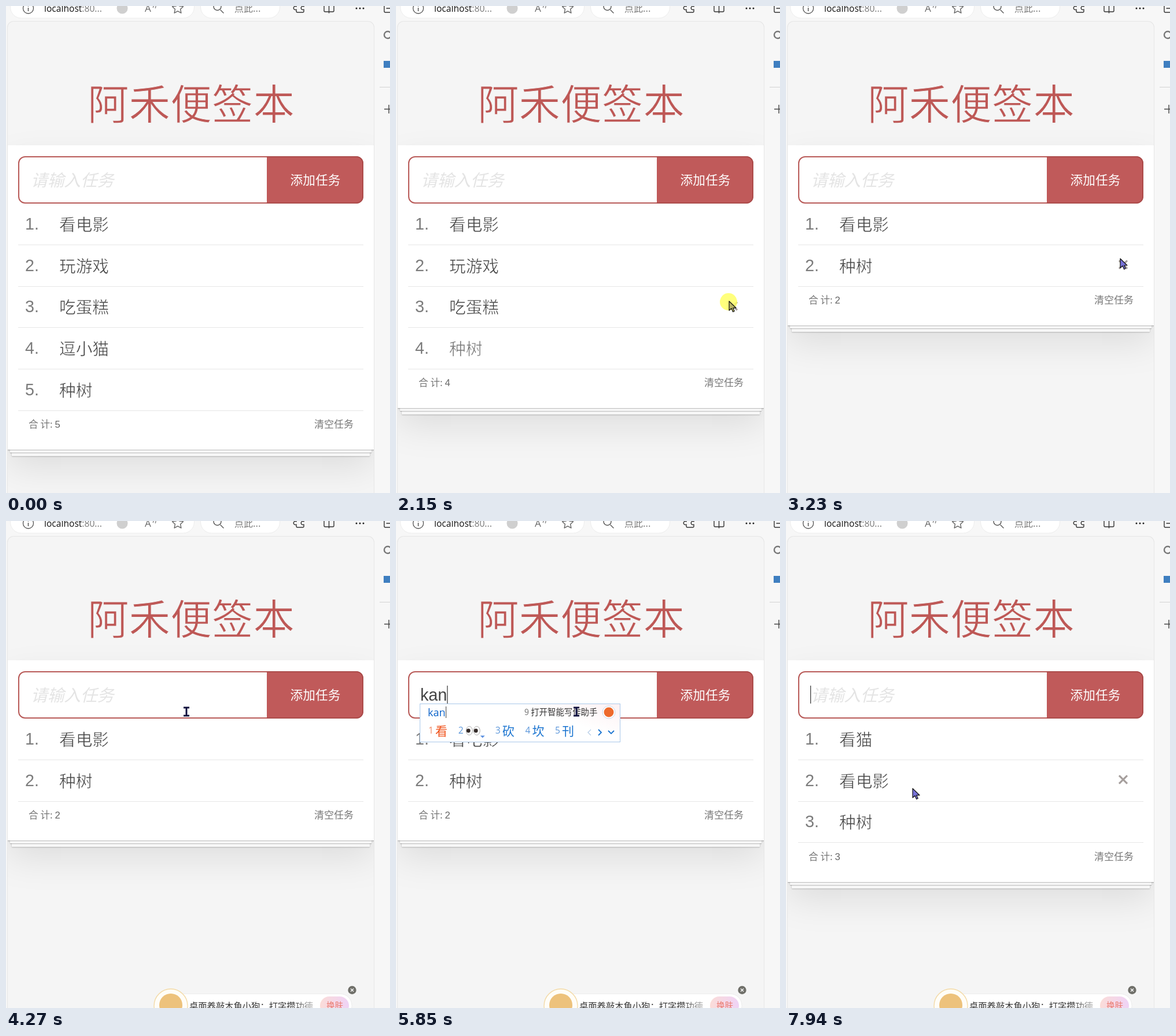
These frames come from a looping animation (664x843 px, 8000 ms). An HTML page:

```html
<!DOCTYPE html>
<html lang="zh-CN">
<head>
<meta charset="utf-8">
<title>Todo list</title>
<style>
html, body { margin: 0; width: 100%; height: 100%; overflow: hidden; background: #f7f7f7; }
#stage { position: relative; width: 100%; height: 100%; overflow: hidden; contain: strict; }
#page { position: absolute; left: 2px; top: 26px; width: 633px; bottom: 0; overflow: hidden;
  border: 1px solid #e6e6e6; border-bottom: 0; border-radius: 11px 11px 0 0; background: #f5f5f5; }
#card { position: absolute; left: 0; top: 214px; width: 633px; background: #fff;
  box-shadow: 0 1px 1px rgba(0,0,0,.22), 0 9px 0 -4px #f7f7f7, 0 10px 1px -4px rgba(0,0,0,.22),
    0 18px 0 -7px #f7f7f7, 0 19px 2px -7px rgba(0,0,0,.22),
    0 2px 4px rgba(0,0,0,.08), 0 30px 60px rgba(0,0,0,.1); }
svg { position: absolute; left: 0; top: 0; }
text { font-family: "Noto Sans CJK SC", "Noto Sans CJK", sans-serif; font-weight: 300; white-space: pre; }
.arial { font-family: "Liberation Sans", Arial, sans-serif; font-weight: 400; }
.ui { font-family: "Open Sans", "Noto Sans CJK SC", sans-serif; font-weight: 400; }
.title { stroke: #f4f4f4; stroke-width: 1; }
.thin { stroke: #fff; stroke-width: .6; }
.icon { fill: none; stroke: #333; stroke-width: 1.4; stroke-linecap: round; stroke-linejoin: round; }
</style>
</head>
<body>
<div id="stage">
<div id="page"><div id="card"></div></div>
<svg width="664" height="843" viewBox="0 0 664 843">
  <defs>
    <linearGradient id="skin"><stop stop-color="#fbdcd8"/><stop offset="1" stop-color="#efd3f6"/></linearGradient>
    <linearGradient id="panel" y1=".6" x2="1" y2="0">
      <stop offset=".6" stop-color="#fff"/><stop offset="1" stop-color="#fdf1f3"/>
    </linearGradient>
    <linearGradient id="fade" gradientUnits="userSpaceOnUse" x1="495" x2="532">
      <stop stop-color="#333"/><stop offset="1" stop-color="#bbb"/>
    </linearGradient>
  </defs>
  <g id="chrome"></g>
  <g id="live"></g>
</svg>
</div>
<script>
const LOOP = 8000, ROW = 71.7, TOP = 342, BLINK = 530;
const $ = id => document.getElementById(id);
const pen = document.createElement('canvas').getContext('2d');

const text = (x, y, size, fill, str, attrs = '') =>
  `<text x="${x}" y="${y}" font-size="${size}" fill="${fill}" ${attrs}>${str}</text>`;
const rect = (x, y, w, h, fill, attrs = '') =>
  `<rect x="${x}" y="${y}" width="${w}" height="${h}" fill="${fill}" ${attrs}/>`;
const circle = (x, y, r, fill, attrs = '') =>
  `<circle cx="${x}" cy="${y}" r="${r}" fill="${fill}" ${attrs}/>`;
const path = (d, attrs = 'class="icon"') => `<path d="${d}" ${attrs}/>`;
const line = (d, color, width) => path(d, `fill="none" stroke="${color}" stroke-width="${width}"`);
const width = (str, font) => { pen.font = font; return pen.measureText(str).width; };
const last = (list, t) => list.filter(k => k[0] <= t).pop();

function star(cx, cy, r) {
  const pts = Array.from({ length: 10 }, (_, i) => {
    const a = i * Math.PI / 5 - Math.PI / 2, q = i % 2 ? r * .48 : r;
    return (cx + q * Math.cos(a)).toFixed(1) + ' ' + (cy + q * Math.sin(a)).toFixed(1);
  });
  return path('M' + pts.join('L') + 'Z', 'class="icon" style="stroke:#666"');
}

function chrome() {
  const pill = 'rx="19" stroke="#ededed"';
  return rect(7.5, -18, 318, 39, '#fff', pill) + rect(336.5, -18, 137, 39, '#fff', pill)
    + circle(38.5, 4, 9, 'none', 'stroke="#555" stroke-width="1.3"') + line('M38.5 3V9M38.5 -1V.8', '#555', 1.5)
    + text(66, 10, 15.6, '#111', 'localhost<tspan fill="#777">:80...</tspan>', 'class="ui"')
    + circle(201, 4, 9.5, '#cfcfcf')
    + text(240, 10, 17, '#666', 'A', 'class="ui"') + line('M254 -3q2 3 0 6M258 -3q2 4 0 7', '#777', 1.2)
    + star(297, 4, 10)
    + path('M371 7L376 12M372 1a6.5 6.5 0 1 1-13 0a6.5 6.5 0 1 1 13 0', 'class="icon" style="stroke:#555"')
    + text(395, 10, 16, '#777', '点此...')
    + path('M502 -4V1a3 3 0 1 0 0 5V9q0 2 2 2H513q2 0 2-2V6a3 3 0 1 1 0-5V-4')
    + path('M550 -4V8q0 2 2 2H565q2 0 2-2V-4M558.5 -4V12')
    + [606, 612, 618].map(x => circle(x, 4, 1.5, '#222')).join('')
    + path('M664 -3H656q-2 0-2 2V9q0 2 2 2H664M658 4H664')
    + circle(660, 50, 6, 'none', 'stroke="#777" stroke-width="2.4"')
    + rect(653, 95, 12, 12, '#3f7fc0')
    + line('M646 140.5H664', '#d2d2d2', 1) + line('M654 178.5H664M662 171V186', '#444', 1.4)
    + text(320, 196, 71.6, '#be5856', '阿禾便签本', 'text-anchor="middle" class="title"')
    + rect(22, 261, 595, 80, '#fff', 'rx="11" stroke="#b85a58" stroke-width="2"')
    + path('M451 261H606a11 11 0 0 1 11 11V330a11 11 0 0 1-11 11H451Z', 'fill="#c05a5a"')
    + line('M451 261H606a11 11 0 0 1 11 11V330a11 11 0 0 1-11 11H451', '#a84847', 1.6)
    + text(535, 308.5, 21.7, '#fff', '添加任务', 'text-anchor="middle"');
}

function tasks(t) {
  const list = ['看电影', '玩游戏', '吃蛋糕', '逗小猫', '种树'];
  [[910, 3], [2280, 2], [3000, 1]].forEach(([at, i]) => t >= at && list.splice(i, 1));
  if (t >= 7250) list.unshift('看猫');
  return list;
}

// time, x, y of the pointer tip
const route = [[60, 258, 846], [300, 430, 745], [540, 626, 650], [700, 583, 590], [840, 579, 586],
  [1240, 579, 586], [1570, 576, 511], [2330, 576, 511], [2540, 578, 439], [3440, 578, 437],
  [3720, 312, 330], [7870, 312, 330], [7900, 219, 463], [LOOP, 219, 463]];

function pointer(t) {
  if (t < 60) return null;
  const i = route.findIndex(p => p[0] > t), a = route[i - 1], b = route[i];
  let k = (t - a[0]) / (b[0] - a[0]);
  if (t > 1240) k = k * k * (3 - 2 * k);
  return { x: a[1] + (b[1] - a[1]) * k, y: a[2] + (b[2] - a[2]) * k };
}

const clicks = [[700, 910], [2080, 2280], [2830, 3000]];

function drawPointer(t, p) {
  if (p.y < TOP && p.x < 451) {
    const d = `M${p.x - 5} ${p.y - 7}h10M${p.x - 5} ${p.y + 7}h10M${p.x} ${p.y - 7}v14`;
    return line(d, '#aab', 3.6) + line(d, '#0d0d3c', 2.5);
  }
  const down = clicks.some(c => t >= c[0] && t < c[1]);
  const fill = down ? '#b9b466' : t < 2540 ? '#777' : '#7772d8';
  return (down ? circle(p.x - 1, p.y + 1, 15, '#ffff66', 'opacity=".85"') : '')
    + path(`M${p.x} ${p.y}v16l4-3.5 2.6 6 2.6-1.2-2.5-5.6h5.3Z`,
      `fill="${fill}" stroke="#111" stroke-width="1.2" stroke-linejoin="round"`);
}

function drawList(t, list, p) {
  const hover = p && p.x > 21 && p.x < 617 ? Math.floor((p.y - TOP) / ROW) : -1;
  let out = '';
  list.forEach((name, i) => {
    const y = 378 + i * ROW, faint = i === 3 && t >= 910 && t < 2280;
    out += text(33, y + 9, 28.7, '#7c7c7c', i + 1 + '.', 'class="arial"')
      + text(92, y + 11, 28.7, faint ? '#777' : '#444', name, 'class="thin"')
      + rect(21, Math.round(y + 35), 597, 1, '#e6e6e6');
    if (i === hover) out += line(`M576 ${y - 9}l14 14m0 -14l-14 14`, '#a69f9d', 3.2);
  });
  const y = 371.5 + list.length * ROW;
  return out + text(39, y, 16.7, '#777', `合 计: <tspan class="arial" fill="#666">${list.length}</tspan>`)
    + text(533, y, 17, '#777', '清空任务');
}

// time, typed letters, right edge of the panel, candidates (@ is the eyes emoji)
const typing = [
  [5140, 'k', 388, '看 可 开 快 卡'], [5400, 'ka', 388, '卡 咖 咔 喀 佧'], [5700, 'kan', 388, '看 @ 砍 坎 刊'],
  [5990, 'kanm', 477, '看吗 看没 看满 看门 看明'], [6130, 'kanma', 477, '看吗 看妈 看马 砍吗 看嘛'],
  [6310, 'kanmao', 475, '看猫 看毛 看帽 砍猫 侃猫'], [6670, '', 0, '']];

function eyes(x) {
  return [0, 13].map(d => `<ellipse cx="${x + 6 + d}" cy="363" rx="5.5" ry="7.5" fill="#fff" stroke="#aaa"/>`
    + circle(x + 4.5 + d, 363, 3.4, '#332a28')).join('')
    + path(`M${x + 25} 371.5h8l-4 4Z`, 'fill="#5a8fe0"');
}

function drawPanel([, letters, right, cands]) {
  const blue = '#1a74d0';
  let out = rect(41.5, 316.5, right - 42, 66, 'url(#panel)', 'stroke="#a9c8ea"')
    + text(55, 338, 18, '#0a62c9', letters, 'class="ui"')
    + rect(55.5 + width(letters, '18px "Open Sans", sans-serif'), 321, 1, 20, '#444')
    + text(right - 166, 336, 14.4, '#333', '<tspan fill="#777">9</tspan> 打开智能写作助手')
    + circle(right - 20, 331, 11, '#fff', 'stroke="#cbd6e6"') + circle(right - 20, 331, 8.5, '#ee6a2c');
  let x = 56;
  cands.split(' ').forEach((word, i) => {
    const color = i ? blue : '#f0531c';
    out += text(x, 368, 15.5, i ? '#5b96da' : '#f08a66', i + 1, 'class="ui"')
      + (word === '@' ? eyes(x + 13) : text(x + 12, 370.5, 21, color, word));
    x += word === '@' ? 64 : 30.7 + 21 * word.length;
  });
  return out + line(`M${right - 51} 361l-5 5 5 5`, '#b9cfe8', 1.4)
    + line(`M${right - 38} 361l5 5-5 5M${right - 21} 363l5 5 5-5`, blue, 1.8);
}

function drawInput(t, letters) {
  const value = t >= 6670 && t < 7250 ? '看猫' : letters;
  const w = letters ? width(letters, '28.7px "Liberation Sans", Arial, sans-serif') : value.length * 28.7;
  const since = t >= 6810 ? 6810 : 3720;
  const blinkOn = Math.floor((t - since) / BLINK) % 2 === 0;
  const caret = t >= 3720 && (t >= 5140 && t < 6810 || blinkOn);
  return (value ? text(42, 311, 28.7, '#444', value, `class="${letters ? 'arial' : 'thin'}"`)
      : text(43, 312, 28.7, '#e4e4e4', '请输入任务', 'font-style="italic"'))
    + (caret ? rect(42 + w, 285, 1.2, 31, '#333') : '');
}

function drawAd() {
  return rect(268, 818.5, 330, 42, '#fff', 'rx="20" stroke="#ececec"')
    + circle(285, 839, 29, '#fffdf7', 'stroke="#f3d9a4" stroke-width="1.3"') + circle(285, 838, 20, '#edc27c')
    + text(317, 844.5, 15.3, 'url(#fade)', '桌面养敲木鱼小狗：打字攒功德')
    + rect(543, 823, 50, 32, 'url(#skin)', 'rx="16"') + text(554, 844, 14.6, '#ea7b70', '换肤')
    + circle(598.5, 812, 7.2, '#70706a') + line('M596 809.5l5 5m0 -5l-5 5', '#fff', 1.3);
}

let shown = '';
function draw(t) {
  const list = tasks(t), p = pointer(t), key = last(typing, t);
  const letters = key ? key[1] : '';
  const out = drawList(t, list, p) + drawInput(t, letters)
    + (letters ? drawPanel(key) : '')
    + (t >= 4130 ? drawAd() : '')
    + (p ? drawPointer(t, p) : '');
  if (out === shown) return;
  shown = out;
  $('card').style.height = Math.round(168.5 + list.length * ROW) + 'px';
  $('live').innerHTML = out;
}

$('chrome').innerHTML = chrome();
let start;
function tick(now) {
  start ??= now;
  draw((now - start) % LOOP);
  requestAnimationFrame(tick);
}
draw(0);
requestAnimationFrame(tick);
</script>
</body>
</html>
```
